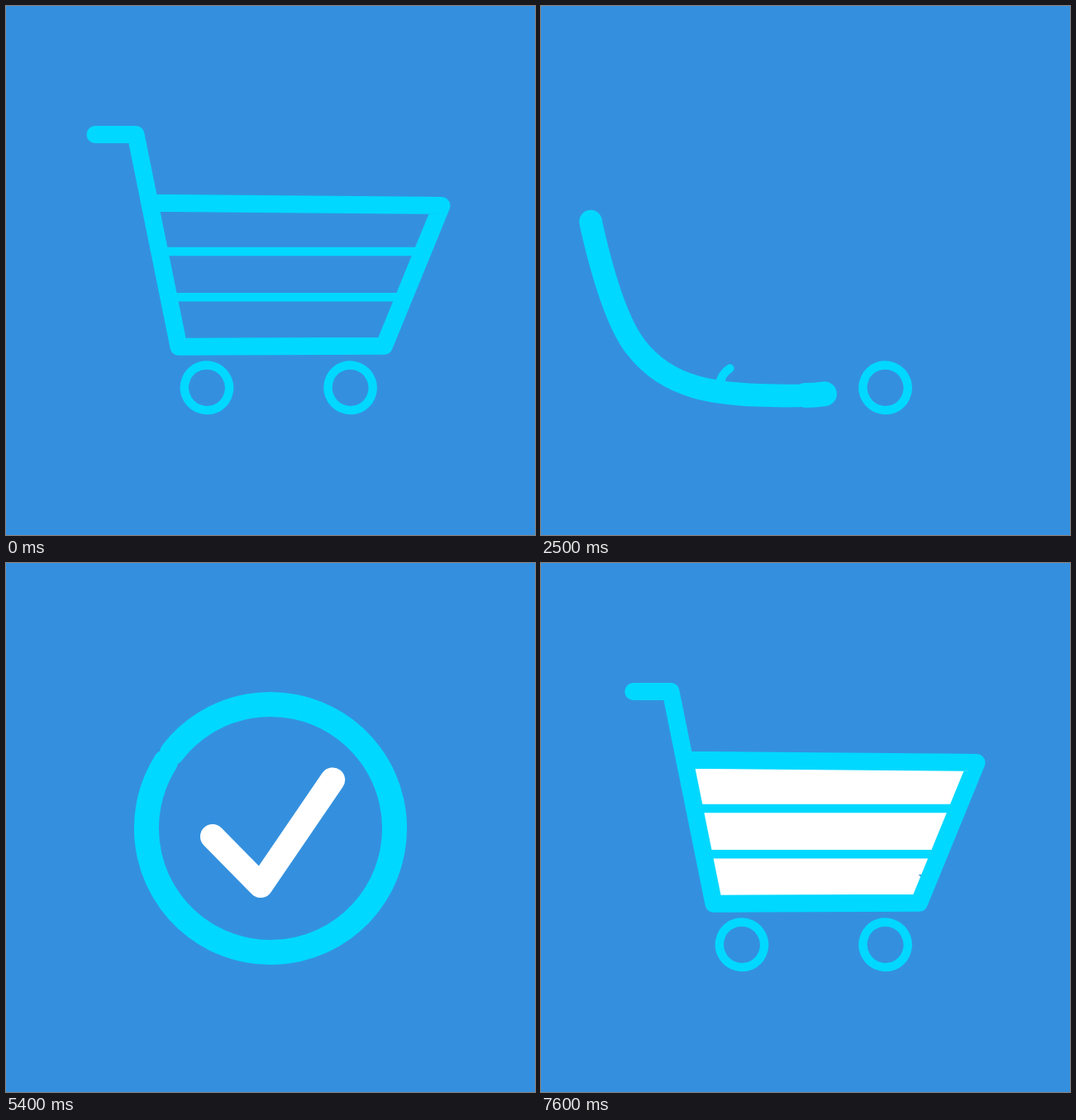
An HTML page for the animation above (7.7 s loop, 640 by 640 pixels).

```html
<!DOCTYPE html>
<html lang="en">
<head>
<meta charset="utf-8">
<title>Cart to check</title>
<style>
  html, body { margin: 0; width: 100%; height: 100%; overflow: hidden; background: #3490de; }
  svg { display: block; width: 100%; height: 100%; }
  path { fill: none; stroke: #00d8ff; stroke-width: 30; stroke-linecap: round; stroke-linejoin: round; }
  .thin { stroke-width: 10.4; }
  #check { stroke: #fff; }
</style>
</head>
<body>
<svg viewBox="0 0 640 640">
  <path id="check"/>
  <path id="ringIn" d="M320 471a150 150 0 0 0 0-300a150 150 0 0 0 0 300"/>
  <path id="ringOut" d="M193 241A150 150 0 0 1 447 401A150 150 0 0 1 193 241"/>
  <path id="swoop" d="M108 155.5C56 155.5 47 200 62 270C74 322 92 384 115 413C152 461 205 473 311 471.5"/>
  <path id="upper" class="thin" d="M188 297H500"/>
  <path id="lower" class="thin" d="M199 352.3H478"/>
  <path id="cart" d="M173.5 238.3L527 241.5L457.5 411.3L209 412.3L157 155.5H108"/>
  <path id="wheelA" class="thin" d="M228.4 438.5A27.5 27.5 0 0 0 257.6 485.1A27.5 27.5 0 0 0 228.4 438.5"/>
  <path id="wheelB" class="thin" d="M402 438.5A27.5 27.5 0 0 0 431.2 485.1A27.5 27.5 0 0 0 402 438.5"/>
</svg>
<script>
const LOOP = 7700, STEP = 100;
const parts = {};
document.querySelectorAll('path').forEach(p => parts[p.id] = p);

// Check mark, loop over the top, then a zigzag that fills the basket.
const leftAt = y => 192 + (y - 249) * 0.2026;
const rightAt = y => 506 - (y - 252) * 0.414;
const rows = [284, 310, 336, 362, 390];
let route = 'M249.5 330.5L308 390L394 264C438 207 462.5 166 462.5 130' +
  'C462.5 88 428 54 387 54C358 54 337 74 337 100V258' +
  `H${rightAt(258)}H${leftAt(258)}`;
rows.forEach((y, i) => {
  const [from, to] = i % 2 ? [rightAt, leftAt] : [leftAt, rightAt];
  route += `L${from(y)} ${y}H${to(y)}`;
});
parts.check.setAttribute('d', route);

const lengths = {};
for (const id in parts) lengths[id] = parts[id].getTotalLength();

const progress = (t, from, to) => Math.min(1, Math.max(0, (t - from) / (to - from)));
const quad = (t, from, to) => {
  const x = progress(t, from, to);
  return x < 0.5 ? 2 * x * x : 1 - 2 * (1 - x) ** 2;
};
const sine = (t, from, to) => (1 - Math.cos(Math.PI * progress(t, from, to))) / 2;
const mix = (a, b, x) => a + (b - a) * x;

// Shows the stretch of a path between two distances from its start.
function show(id, from, to, width) {
  const { style } = parts[id];
  const span = to - from;
  style.visibility = span > 0.5 ? 'visible' : 'hidden';
  style.strokeDasharray = `${Math.max(span, 0)} 9999`;
  style.strokeDashoffset = -from;
  if (width) style.strokeWidth = width;
}

const showPart = (id, from, to, width) =>
  show(id, from * lengths[id], to * lengths[id], width);

function draw(t) {
  const leaving = t >= 5400;
  const growing = mix(21, 30, progress(t, 1900, 2700));

  if (leaving) {
    showPart('cart', 0, t < 5500 ? 0 : quad(t, 5300, 7700),
      mix(30, 21, progress(t, 5500, 6300)));
  } else {
    showPart('cart', sine(t, 0, 2170), 1, growing);
  }
  showPart('swoop', quad(t, 1944, 3465), quad(t, 1280, 2400), growing);
  showPart('ringIn', 0, leaving ? 0 : quad(t, 2372, 3530));
  show('ringOut', Math.min(lengths.ringOut, 14 * ((t - 5300) / 100) ** 2),
    leaving ? lengths.ringOut : 0);

  const tick = 236;
  if (leaving) {
    const run = progress(t, 5300, 7600) ** 2.28;
    show('check', 742 * quad(t, 5350, 7700), mix(tick, lengths.check, run));
  } else {
    show('check', 0, tick * quad(t, 2700, 4000));
  }

  const thin = (id, out, outEnd, back, backEnd) =>
    showPart(id, 0, leaving ? quad(t, back, backEnd) : 1 - quad(t, out, outEnd));
  thin('upper', 200, 1000, 7000, 7500);
  thin('lower', 900, 1600, 6900, 7400);
  thin('wheelA', 1800, 2800, 6600, 7500);
  thin('wheelB', 2500, 3200, 6600, 7500);
}

function frame() {
  const t = performance.now() % LOOP;
  draw(Math.floor(t / STEP) * STEP);
  requestAnimationFrame(frame);
}
frame();
</script>
</body>
</html>
```
